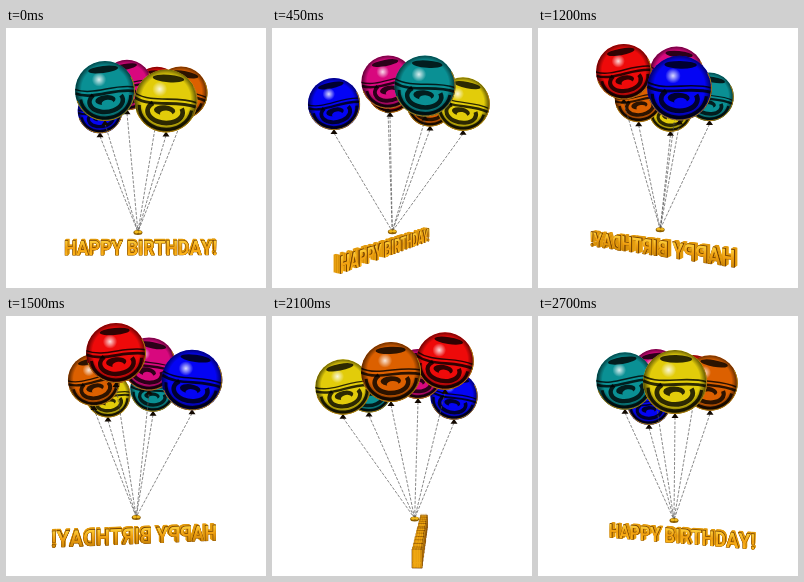
Recreate the animation shown at these times as an HTML page with a canvas. Size 260 by 260 pixels, loop 2.85 s.

```html
<!DOCTYPE html>
<html>
<head>
<meta charset="utf-8">
<style>
html, body { margin: 0; height: 100%; overflow: hidden; background: #fff; }
canvas { display: block; width: 260px; height: 260px; }
</style>
</head>
<body>
<canvas id="stage" width="260" height="260"></canvas>
<script>
const ctx = document.getElementById('stage').getContext('2d');
const STEPS = 19, STEP_MS = 150, RAD = Math.PI / 180, TAU = 2 * Math.PI;
const LABEL = 'HAPPY BIRTHDAY!', FONT = '700 18.4px Roboto, "Liberation Sans", sans-serif';

// Each balloon circles the axis; waypoints (x, y at KEYS) add the sway.
const KEYS = [0, 3, 6, 10, 12, 14, 18];
const balloons = [
  { color: '#0a9094', orbit: 50, phase: -35, way: [99,63, 153,58, 182,63, 147,73, 121,75, 97,73, 87,65] },
  { color: '#d8087e', orbit: 17, phase: -122, way: [121,57, 116,54, 130,47, 143,48, 146,54, 146,58, 118,58] },
  { color: '#dc6000', orbit: 43, phase: 82, way: [175,65, 158,75, 124,74, 88,64, 95,58, 119,56, 172,67] },
  { color: '#e2cc0a', orbit: 59, phase: 24, way: [160,73, 191,76, 162,81, 102,79, 75,75, 71,71, 137,66] },
  { color: '#ee0a0a', orbit: 46, phase: 144, way: [151,62, 118,62, 83,52, 110,37, 147,37, 173,45, 155,63] },
  { color: '#0404f4', orbit: 62, phase: -146, way: [94,83, 62,76, 92,60, 186,64, 198,71, 182,80, 111,87] }
];

function circlePoint(b, k) {
  const a = k * TAU / STEPS + b.phase * RAD;
  const z = b.orbit * Math.cos(a), s = 1 / (1 - 0.0032 * z);
  return { x: b.orbit * Math.sin(a) * s, y: -9 * Math.cos(a), z, r: 26 * s, turn: 0.2 * Math.sin(a) };
}

function place(b, k) {
  let i = KEYS.length - 1;
  while (KEYS[i] > k) i--;
  const j = (i + 1) % KEYS.length, end = j ? KEYS[j] : STEPS;
  const f = (k - KEYS[i]) / (end - KEYS[i]);
  const p = circlePoint(b, k), p0 = circlePoint(b, KEYS[i]), p1 = circlePoint(b, end);
  p.x += (b.way[2 * i] - p0.x) * (1 - f) + (b.way[2 * j] - p1.x) * f;
  p.y += (b.way[2 * i + 1] - p0.y) * (1 - f) + (b.way[2 * j + 1] - p1.y) * f;
  p.color = b.color;
  return p;
}

function disc(fill, x = 0, y = 0, rx = 1, ry = rx) {
  ctx.fillStyle = fill;
  ctx.beginPath();
  ctx.ellipse(x, y, rx, ry, 0, 0, TAU);
  ctx.fill();
}

function arc(x, y, rx, ry, from, to, width) {
  ctx.lineWidth = width;
  ctx.beginPath();
  ctx.ellipse(x, y, rx, ry, 0, from, to);
  ctx.stroke();
}

function glow(x, y, r0, r1, from, to) {
  const g = ctx.createRadialGradient(x, y, r0, x, y, r1);
  g.addColorStop(0, from);
  g.addColorStop(1, to);
  return g;
}

function drawString(p, hub) {
  ctx.strokeStyle = '#555';
  ctx.lineWidth = 0.7;
  ctx.setLineDash([3, 1.5]);
  ctx.beginPath();
  ctx.moveTo(p.x, p.y + p.r + 3);
  ctx.lineTo(hub.x, hub.y);
  ctx.stroke();
  ctx.setLineDash([]);
}

function drawBalloon(p) {
  const foot = p.y + p.r;
  ctx.fillStyle = '#110800';
  ctx.beginPath();
  ctx.moveTo(p.x, foot - 1);
  ctx.lineTo(p.x + 3.5, foot + 4);
  ctx.lineTo(p.x - 3.5, foot + 4);
  ctx.fill();

  ctx.save();
  ctx.translate(p.x, p.y);
  ctx.scale(p.r, p.r);
  disc(p.color);
  ctx.clip();
  ctx.rotate(p.turn);

  // Dark reflected swirls
  const dark = 'rgba(0,0,0,.8)';
  ctx.filter = 'blur(0.7px)';
  ctx.strokeStyle = dark;
  disc(dark, 0.02, -0.72, 0.5, 0.12);
  for (const [y, width] of [[-0.02, 0.05], [0.12, 0.09]]) {
    ctx.lineWidth = width;
    ctx.beginPath();
    ctx.moveTo(-1, y - 0.15);
    ctx.bezierCurveTo(-0.4, y + 0.15, 0.3, y - 0.2, 1, y);
    ctx.stroke();
  }
  arc(0, 0.34, 0.56, 0.36, -0.4, 3.9, 0.15);
  arc(0, 0.16, 0.84, 0.74, 0.1, 3.1, 0.1);
  disc(dark, -0.02, 0.3, 0.34, 0.16);
  disc(p.color, 0.04, 0.42, 0.2, 0.12);
  ctx.filter = 'none';
  ctx.rotate(-p.turn);

  disc(glow(0, -0.05, 0.78, 1.05, 'rgba(0,0,0,0)', 'rgba(0,0,0,.8)'));
  disc(glow(-0.2, -0.38, 0, 0.24, 'rgba(255,255,255,.85)', 'rgba(255,255,255,0)'), -0.2, -0.38, 0.24);
  ctx.restore();

  ctx.strokeStyle = '#a97a10';
  ctx.lineWidth = 1;
  ctx.beginPath();
  ctx.arc(p.x, p.y, p.r - 0.4, -0.5, 2.8);
  ctx.stroke();
}

function drawLabel(k, sway) {
  const a = k * TAU / STEPS + 0.04 * sway, cos = Math.cos(a), sin = Math.sin(a);
  const midX = 131 + 19 * sway, size = 1 - 0.045 * cos;
  ctx.font = FONT;
  ctx.textAlign = 'center';
  const total = ctx.measureText(LABEL).width;
  const project = (u, n) => {
    const x = (u * cos + n * sin) * size, z = (n * cos - u * sin) * size;
    const s = 1 / (1 - 0.0026 * z);
    return { x: midX + x * s, y: 129 + 90 * s, z, s: s * size };
  };
  let u = -total / 2;
  const letters = [...LABEL].map(ch => {
    const w = ctx.measureText(ch).width, mid = u + w / 2;
    u += w;
    return { ch, w, mid, z: project(mid, 0).z };
  }).sort((l, m) => l.z - m.z);

  const gold = ctx.createLinearGradient(0, -7, 0, 7);
  gold.addColorStop(0, '#ffd23c');
  gold.addColorStop(0.5, '#f0a010');
  gold.addColorStop(1, cos > 0 ? '#ffb81c' : '#c88408');
  const facing = cos < 0 ? -1 : 1;

  // Side of a letter that turns towards the viewer
  function drawWall(l) {
    const edge = l.mid - Math.sign(sin) * l.w * 0.36;
    const back = project(edge, -4), front = project(edge, 4);
    ctx.beginPath();
    ctx.moveTo(back.x, back.y - 7.5 * back.s);
    ctx.lineTo(front.x, front.y - 7.5 * front.s);
    ctx.lineTo(front.x, front.y + 7.5 * front.s);
    ctx.lineTo(back.x, back.y + 7.5 * back.s);
    ctx.closePath();
    ctx.fillStyle = '#f0a814';
    ctx.fill();
    ctx.strokeStyle = '#6e3a00';
    ctx.lineWidth = 0.7;
    ctx.stroke();
  }

  for (const l of letters) {
    if (l.ch == ' ') continue;
    if (Math.abs(sin) > 0.85) drawWall(l);
    for (let n = -4; n <= 4; n++) {
      const depth = n * facing;
      const p = project(l.mid, depth);
      const p0 = project(l.mid - l.w / 2, depth), p1 = project(l.mid + l.w / 2, depth);
      ctx.save();
      ctx.transform((p1.x - p0.x) / l.w, (p1.y - p0.y) / l.w, 0, p.s * 1.14, p.x, p.y);
      ctx.fillStyle = n == 4 ? gold : n == 3 ? '#6e3a00' : n % 2 ? '#d08a08' : '#f0a814';
      ctx.fillText(l.ch, 0, 6.6);
      if (n < 4) {
        ctx.strokeStyle = ctx.fillStyle;
        ctx.lineWidth = 0.8;
        ctx.strokeText(l.ch, 0, 6.6);
      }
      ctx.restore();
    }
  }
}

function draw(now) {
  const k = Math.floor(now / STEP_MS) % STEPS;
  const sway = Math.cos((k - 14.7) * TAU / STEPS);
  const hub = { x: 130 + 13 * sway, y: 202.5 + 1.5 * Math.cos(k * TAU / STEPS) };
  ctx.clearRect(0, 0, 260, 260);
  drawLabel(k, sway);
  const placed = balloons.map(b => place(b, k)).sort((p, q) => p.z - q.z);
  for (const p of placed) {
    drawString(p, hub);
    drawBalloon(p);
  }
  disc('#8a5c00', hub.x, hub.y + 0.5, 4.5, 2.5);
  disc('#f0b81c', hub.x - 1.5, hub.y, 2, 1.4);
  disc('#f0b81c', hub.x + 2, hub.y, 1.8, 1.3);
}

const start = performance.now();
function tick() {
  draw(performance.now() - start);
  requestAnimationFrame(tick);
}
tick();
</script>
</body>
</html>
```
